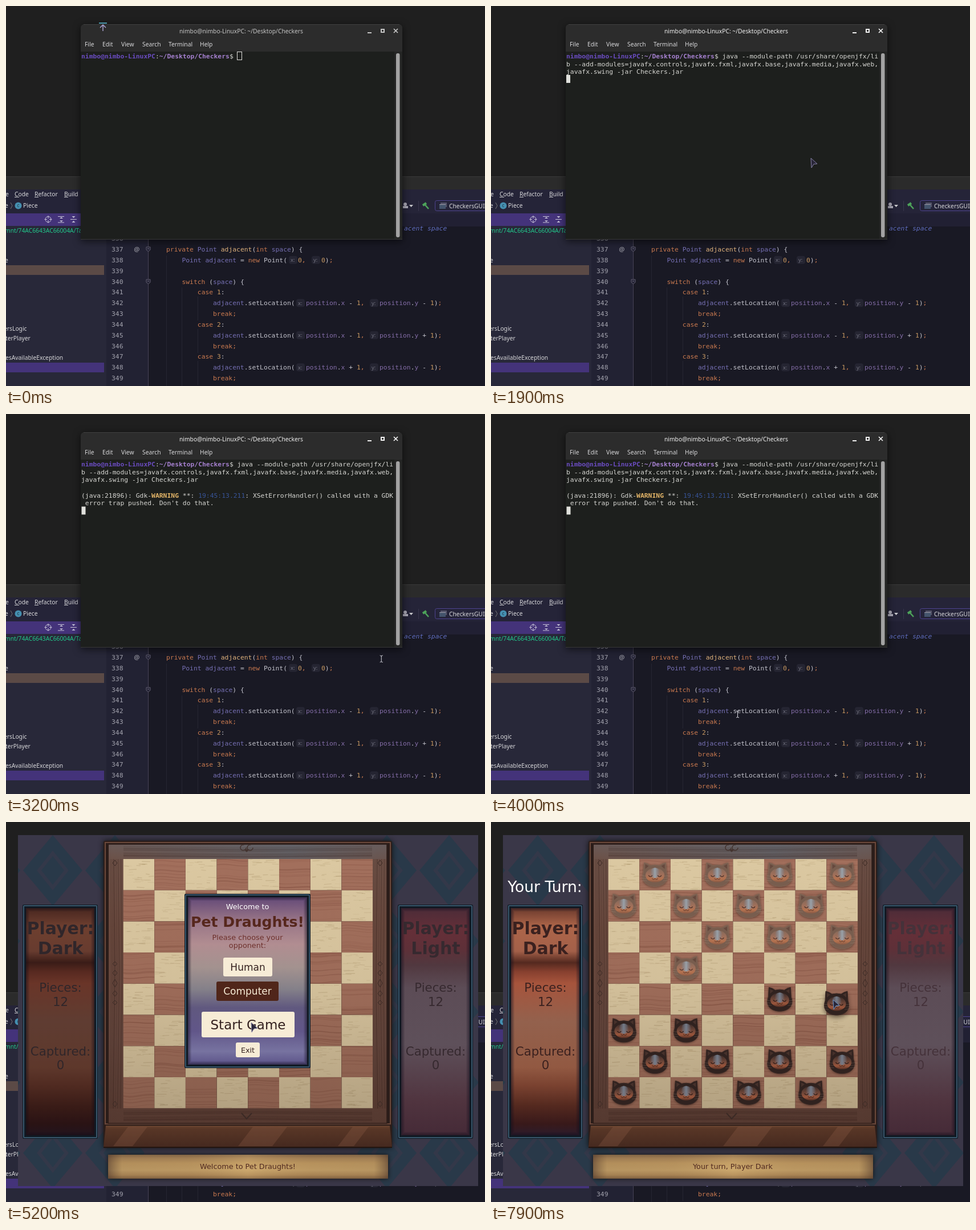
Animation, 840 px wide and 667 px high, one loop 8 s. Source, as an HTML page with a canvas:

```html
<!DOCTYPE html>
<html lang="en">
<head>
<meta charset="utf-8">
<title>Draughts launch</title>
<style>
html, body { margin: 0; width: 100%; height: 100%; overflow: hidden; background: #1f1f1f; }
canvas { display: block; }
</style>
</head>
<body>
<canvas id="stage" width="840" height="667"></canvas>
<script>
const W = 840, H = 667, LOOP = 8000, STEP = 100;
const UI = '"Noto Sans", "Open Sans", sans-serif';
const MONO = '"DejaVu Sans Mono", "Noto Sans Mono", monospace';
const GAME = '"DejaVu Sans", sans-serif';
const USER = 'nimbo', HOST = 'nimbo-LinuxPC', TITLE = 'Pet Draughts';
const CELL = 54.7, BX = 205.5, BY = 65;
const screen = document.getElementById('stage').getContext('2d');
let c = screen;

function layer(draw) {
  const canvas = document.createElement('canvas');
  canvas.width = W;
  canvas.height = H;
  c = canvas.getContext('2d');
  draw();
  c = screen;
  return canvas;
}
function randomizer(seed) {
  return () => (seed = (seed * 16807) % 2147483647) / 2147483647;
}
function rect(x, y, w, h, fill) {
  c.fillStyle = fill;
  c.fillRect(x, y, w, h);
}
function round(x, y, w, h, r, fill, stroke, width = 1) {
  c.beginPath();
  c.roundRect(x, y, w, h, r);
  if (fill) { c.fillStyle = fill; c.fill(); }
  if (stroke) { c.strokeStyle = stroke; c.lineWidth = width; c.stroke(); }
}
function line(points, color, width = 1) {
  c.beginPath();
  points.forEach(([x, y]) => c.lineTo(x, y));
  c.strokeStyle = color;
  c.lineWidth = width;
  c.stroke();
}
function poly(points, fill, stroke, width = 1) {
  c.beginPath();
  points.forEach(([x, y]) => c.lineTo(x, y));
  c.closePath();
  if (fill) { c.fillStyle = fill; c.fill(); }
  if (stroke) { c.strokeStyle = stroke; c.lineWidth = width; c.stroke(); }
}
function disc(x, y, rx, ry, fill) {
  c.beginPath();
  c.ellipse(x, y, rx, ry, 0, 0, 7);
  c.fillStyle = fill;
  c.fill();
}
function gradient(x0, y0, x1, y1, stops) {
  const g = c.createLinearGradient(x0, y0, x1, y1);
  stops.forEach(([at, color]) => g.addColorStop(at, color));
  return g;
}
function text(s, x, y, size, color, family = UI, style = '', align = 'left') {
  c.font = `${style} ${size}px ${family}`;
  c.textAlign = align;
  c.fillStyle = color;
  c.fillText(s, x, y + size * 0.36);
  return x + c.measureText(s).width;
}
const ui = (s, x, y, color = '#d8d8da') => text(s, x, y, 10.3, color);
const label = (s, x, y, size, color, style) => text(s, x, y, size, color, GAME, style, 'center');
function mono(x, y, spans) {
  spans.forEach(([s, color, style]) => { x = text(s, x, y, 11.36, color, MONO, style); });
}

// IDE behind the terminal
const KEY = '#c9794f', NAME = '#7670b4', FIELD = '#846da8', PLAIN = '#c3c3cc', NUM = '#c99a63';
const codeY = n => 427 + (n - 337) * 18.83;

function hint(s, x, y) {
  round(x - 2, y - 7, 15, 14, 4, '#252532');
  text(s, x + 1, y, 9.5, '#71717f');
}
function locationCall(n, dx, dy) {
  const y = codeY(n);
  mono(363, y, [['adjacent', NAME], ['.setLocation(', PLAIN]]);
  hint('x:', 511, y);
  mono(526, y, [['position', FIELD], ['.', PLAIN], ['x', FIELD], [` ${dx} `, PLAIN], ['1', NUM], [',', KEY]]);
  hint('y:', 640, y);
  mono(655, y, [['position', FIELD], ['.', PLAIN], ['y', FIELD], [` ${dy} `, PLAIN], ['1', NUM], [')', PLAIN], [';', KEY]]);
  mono(363, codeY(n + 1), [['break;', KEY]]);
}
function drawIde() {
  rect(0, 0, W, H, '#1f1f1f');
  rect(0, 299, W, 368, '#282839');
  rect(0, 299, W, 23, '#2b2b2b');
  line([[0, 299.5], [W, 299.5]], '#393939');
  rect(0, 322, W, 42, '#252438');
  rect(176, 364, 664, 23, '#212033');
  rect(176, 387, 74, 280, '#222233');
  rect(250, 387, 590, 280, '#191924');
  line([[249.5, 387], [249.5, H]], '#474356');

  ui('e', -1, 330);
  [['Code', 15, 8], ['Refactor', 50, 7], ['Build', 102, 7]].forEach(([s, x, w]) => {
    ui(s, x, 330);
    line([[x, 335.5], [x + w, 335.5]], '#c8c8cc');
  });
  ui('e', -2, 350);
  line([[8, 345], [11, 350.5], [8, 356]], '#777');
  disc(21.5, 350.5, 6, 6, '#458fb0');
  text('c', 21.5, 350, 8, '#203848', UI, '', 'center');
  ui('Piece', 30, 350);
  rect(0, 364, 131, 22, '#44337a');
  c.beginPath();
  c.arc(74, 374.5, 5, 0, 7);
  c.strokeStyle = '#c8c4d8';
  c.stroke();
  line([[74, 368], [74, 373]], '#c8c4d8');
  line([[74, 376], [74, 381]], '#c8c4d8');
  line([[67.5, 374.5], [72, 374.5]], '#c8c4d8');
  line([[76, 374.5], [80.5, 374.5]], '#c8c4d8');
  [[91, 369.5, 380], [113, 374.5, 374.5]].forEach(([x, a, b]) => {
    line([[x, a], [x + 11, a]], '#c8c4d8');
    line([[x, b], [x + 11, b]], '#c8c4d8');
  });
  poly([[94, 373], [97, 370.5], [100, 373]], '#c8c4d8');
  poly([[94, 376.5], [97, 379], [100, 376.5]], '#c8c4d8');
  poly([[115.5, 369], [121.5, 369], [118.5, 372]], '#c8c4d8');
  poly([[115.5, 380], [121.5, 380], [118.5, 377]], '#c8c4d8');
  ui('mnt/74AC6643AC66004A/Ta', -2, 394, '#22c98c');
  rect(0, 455, 172, 17, '#5b4a46');
  rect(0, 626, 172, 17, '#44337a');
  ui('e', -2, 446);
  ui('ersLogic', -4, 566);
  ui('terPlayer', -1, 583);
  ui('esAvailableException', -1, 617);

  for (let n = 336; n < 350; n++) mono(185, codeY(n), [[n, '#a2a2ad']]);
  text('@', 229.5, 427, 11, '#b0b0b8', UI, '', 'center');
  [427, 484].forEach(y => {
    poly([[246, y - 4], [253, y - 4], [253, y + 1], [249.5, y + 4], [246, y + 1]], '#222233', '#605c70');
    line([[248, y - 1], [251, y - 1]], '#77738a');
  });
  line([[281.5, 438], [281.5, H]], '#262632');
  line([[308.5, 494], [308.5, H]], '#262632');
  [510, 567, 623].forEach(y => line([[336.5, y], [336.5, y + 42]], '#262632'));
  mono(698, 390, [['acent space', '#626fc4', 'italic']]);
  mono(281, codeY(337), [['private ', KEY], ['Point ', NAME], ['adjacent', '#dfb27c'], ['(', PLAIN], ['int ', KEY], ['space', NAME], [') {', PLAIN]]);
  mono(308.4, codeY(338), [['Point adjacent ', NAME], ['= ', PLAIN], ['new ', KEY], ['Point(', PLAIN]]);
  hint('x:', 498, codeY(338));
  mono(512, codeY(338), [['0', NUM], [',', KEY]]);
  hint('y:', 538, codeY(338));
  mono(553, codeY(338), [['0', NUM], [')', PLAIN], [';', KEY]]);
  mono(308.4, codeY(340), [['switch ', KEY], ['(', PLAIN], ['space', NAME], [') {', PLAIN]]);
  [['-', '-'], ['-', '+'], ['+', '-']].forEach(([dx, dy], i) => {
    mono(335.8, codeY(341 + 3 * i), [['case ', KEY], [i + 1, NUM], [':', PLAIN]]);
    locationCall(342 + 3 * i, dx, dy);
  });

  disc(700, 348, 3, 3, '#aaa8b5');
  rect(696, 351, 9, 4, '#aaa8b5');
  poly([[707, 349], [714, 349], [710.5, 353]], '#c8c8cc');
  line([[723.5, 342], [723.5, 360]], '#38364c');
  line([[731, 350], [737, 346]], '#4da35a', 4);
  line([[734, 348], [741, 356]], '#4da35a', 2.5);
  round(752.5, 341.5, 100, 18, 3, '#25243a', '#4e438f');
  rect(762, 345, 11, 8, '#55556a');
  rect(760, 348, 11, 8, '#44546c');
  line([[760, 348.5], [771, 348.5]], '#9a9aa8');
  ui('CheckersGUI', 777, 351);
}

function drawTerminal() {
  c.shadowColor = 'rgba(0,0,0,.6)';
  c.shadowBlur = 14;
  c.shadowOffsetY = 3;
  round(131, 32, 564, 378, [6, 6, 0, 0], '#1d1f1d');
  c.shadowColor = 'transparent';
  round(131, 32, 564, 48, [6, 6, 0, 0], '#2c2c2c');
  line([[136, 32.5], [690, 32.5]], '#424242');
  line([[131, 409.5], [695, 409.5]], '#373737');
  rect(681, 80, 14, 329, '#242524');
  round(684, 83, 6.5, 323, 3, '#a3a3a3');
  ['File', 'Edit', 'View', 'Search', 'Terminal', 'Help'].forEach((s, i) =>
    ui(s, [138, 169, 202, 239, 285, 340][i], 67));
}
function drawTitle(focused) {
  const color = focused ? '#f0f0f0' : '#c4c4c4';
  text(`${USER}@${HOST}: ~/Desktop/Checkers`, 412.5, 44, 10.3, color, UI, '500', 'center');
  rect(634, 46, 7, 2, color);
  c.strokeStyle = color;
  c.lineWidth = 2;
  c.strokeRect(658, 41, 5, 5);
  line([[680, 40], [687, 47]], color, 1.7);
  line([[687, 40], [680, 47]], color, 1.7);
}
const row = n => 88 + n * 13.67;
function drawShell(t) {
  const fg = '#d6d6d2';
  const prompt = [[`${USER}@${HOST}`, '#6a4cc0', 'bold'], [':', fg], ['~/Desktop/Checkers', '#a580cf', 'bold'], ['$ ', fg]];
  if (t < 1300) {
    mono(132, row(0), prompt);
    c.strokeStyle = '#e0e0dc';
    c.lineWidth = 1;
    c.strokeRect(405.5, 80.5, 8, 14);
    return;
  }
  mono(132, row(0), [...prompt, ['java --module-path /usr/share/openjfx/li', fg]]);
  mono(132, row(1), [['b --add-modules=javafx.controls,javafx.fxml,javafx.base,javafx.media,javafx.web,', fg]]);
  mono(132, row(2), [['javafx.swing -jar Checkers.jar', fg]]);
  if (t >= 1900 && t < 2300) rect(132, 121, 7, 14, '#e0e0dc');
  if (t < 2300) return;
  mono(132, row(4), [['(java:21896): Gdk-', fg], ['WARNING', '#e3b568', 'bold'], [' **: ', fg], ['19:45:13.211', '#38559a'], [': XSetErrorHandler() called with a GDK', fg]]);
  mono(132, row(5), [[" error trap pushed. Don't do that.", fg]]);
  if (t >= 2700) rect(132.5, 162.5, 7, 14, '#e0e0dc');
}
function drawMenu(hover) {
  c.shadowColor = 'rgba(0,0,0,.5)';
  c.shadowBlur = 7;
  round(519.5, 128.5, 126, 204, 6, '#393639', '#4b494b');
  c.shadowColor = 'transparent';
  if (hover) rect(520, 247, 125, 24, '#4b4a47');
  [187.5, 218.5, 274.5].forEach(y => line([[520, y], [645, y]], '#5a575a'));
  [['Open Terminal', 147], ['Open Tab', 171], ['Close Window', 202], ['Copy', 234, '#858385'],
    ['Paste', 258], ['Profiles', 289], ['Show Menubar', 313]].forEach(([s, y, color]) => ui(s, 547, y, color || '#eeeef0'));
  round(528, 141.5, 12, 11, 2, '#2b5364', '#62b8c4');
  line([[530, 144], [533, 147], [530, 150]], '#d8a0c0');
  line([[534, 150], [538, 150]], '#d8a0c0');
  round(530, 229, 5, 7, 1, null, '#5d3b8a');
  round(534, 232, 5, 7, 1, null, '#5d3b8a');
  round(528, 253, 10, 12, 1, '#c28a55');
  rect(531, 251, 5, 3, '#dddddd');
  rect(533, 257, 8, 8, '#eeeeec');
  poly([[630, 286], [635, 289.5], [630, 293]], '#eeeeee');
  disc(533, 313.5, 7, 7, '#70bd91');
  line([[529, 313], [532, 316.5], [537, 310]], '#1c4b3b', 2);
}

// Game window
const DARK_PANEL = [[0, '#6b3a2d'], [.08, '#ad6549'], [.19, '#a36049'], [.24, '#54291f'], [.28, '#87402f'],
  [.33, '#a6543c'], [.5, '#93614d'], [.7, '#925942'], [.78, '#7a4230'], [.87, '#54291f'], [.95, '#38191a'], [1, '#2c1c2c']];
const LIGHT_PANEL = [[0, '#4c2c38'], [.1, '#652f38'], [.18, '#5e3038'], [.25, '#51383f'], [.35, '#5c4c56'], [.6, '#5e505a'], [.85, '#50343f'], [1, '#452a37']];

function drawFrame(x, y, w, h, stops) {
  round(x, y, w, h, 2, '#101923');
  round(x + 2, y + 2, w - 4, h - 4, 1, null, '#38566b', 2);
  rect(x + 6, y + 6, w - 12, h - 12, gradient(0, y + 6, 0, y + h - 6, stops));
  for (let i = 0; i < 6; i++) {
    c.strokeStyle = `rgba(18,14,28,${.5 - i * .08})`;
    c.lineWidth = 1;
    c.strokeRect(x + 6.5 + i, y + 6.5 + i, w - 13 - 2 * i, h - 13 - 2 * i);
  }
}
function drawDiamonds() {
  for (const cx of [82, 777]) for (let cy = 85; cy < 700; cy += 124) for (const dx of [-109, 0, 109]) {
    [[52, 62, '#293949'], [28, 35, '#333849'], [20, 25, '#293949']].forEach(([rx, ry, fill]) =>
      poly([[cx + dx, cy - ry], [cx + dx + rx, cy], [cx + dx, cy + ry], [cx + dx - rx, cy]], fill));
  }
}
function clipped(x, y, w, h, draw) {
  c.save();
  c.beginPath();
  c.rect(x, y, w, h);
  c.clip();
  draw();
  c.restore();
}
function drawCells() {
  const rnd = randomizer(73);
  for (let r = 0; r < 8; r++) for (let k = 0; k < 8; k++) {
    const x = BX + k * CELL, y = BY + r * CELL, dark = (r + k) % 2;
    clipped(x, y, CELL, CELL, () => {
      rect(x, y, CELL, CELL, dark ? '#a26f5c' : '#dbc8a1');
      const bend = rnd() * 10 - 5;
      for (let i = 0; i < (dark ? 13 : 24); i++) {
        const gx = dark ? x : x + rnd() * 45, gy = y + rnd() * CELL;
        c.beginPath();
        c.moveTo(gx, gy);
        if (dark) c.bezierCurveTo(x + 18, gy - bend, x + 36, gy + bend, x + 56, gy + bend * .4);
        else c.lineTo(gx + 5 + rnd() * 13, gy + rnd() * 2 - 1);
        c.strokeStyle = dark ? `rgba(105,55,43,${.08 + rnd() * .22})` : `rgba(150,125,85,${.1 + rnd() * .2})`;
        c.lineWidth = .6 + rnd();
        c.stroke();
      }
    });
  }
  rect(BX, BY, 8 * CELL, 8 * CELL, gradient(0, BY, 0, BY + 8 * CELL, [[0, 'rgba(50,35,25,0)'], [.5, 'rgba(50,35,25,.05)'], [1, 'rgba(50,35,25,.23)']]));
}
function drawWoodFrame() {
  rect(180, 39, 488, 490, gradient(0, 39, 0, 529, [[0, '#6a5a57'], [.06, '#6c5046'], [.3, '#68483d'], [.7, '#60433a'], [1, '#553930']]));
  rect(180, 39, 488, 26, gradient(180, 0, 668, 0, [[0, 'rgba(85,110,130,0)'], [.65, 'rgba(85,110,130,.4)'], [1, 'rgba(85,110,130,.1)']]));
  const rnd = randomizer(19);
  for (let i = 0; i < 18; i++) {
    const tone = `rgba(45,27,22,${.05 + rnd() * .17})`, x = 183 + rnd() * 20, y = 43 + rnd() * 18;
    line([[x, 65], [x + 2, 260], [x - 1, 503]], tone);
    line([[x + 462, 65], [x + 460, 280], [x + 463, 503]], tone);
    line([[206, y], [420, y + 2], [642, y]], tone);
    line([[206, y + 464], [420, y + 462], [642, y + 464]], tone);
  }
  c.strokeStyle = '#2c1d19';
  c.lineWidth = 1.5;
  c.strokeRect(179, 39, 489, 490);
  [416, 428].forEach(x => {
    c.beginPath();
    c.arc(x, 45, 5, 0, 5);
    c.strokeStyle = '#443430';
    c.lineWidth = 1.5;
    c.stroke();
  });
  poly([[417, 48], [427, 48], [422, 53]], '#443430');
  line([[413, 511], [422, 521], [431, 511]], '#3b2a25', 2);
  [191, 656].forEach(x => {
    [[0, 7], [-18, 5], [18, 5], [-34, 4], [34, 4], [-211, 5], [212, 5]].forEach(([dy, s]) =>
      poly([[x, 283 + dy - s], [x + 4, 283 + dy], [x, 283 + dy + s], [x - 4, 283 + dy]], null, '#3b2a25'));
  });
}
function drawBoard() {
  rect(21, 23, 807, 616, '#3a3748');
  clipped(21, 23, 807, 616, drawDiamonds);
  c.shadowColor = '#111';
  c.shadowBlur = 10;
  round(171, 33, 506, 539, 3, '#2b1d1a');
  c.shadowColor = 'transparent';
  c.strokeStyle = '#6b483a';
  c.lineWidth = 2;
  c.strokeRect(174, 36, 500, 494);
  drawWoodFrame();
  drawCells();
  poly([[175, 533], [673, 533], [677, 571], [171, 571]], gradient(0, 533, 0, 571, [[0, '#68432f'], [.15, '#583626'], [1, '#45291f']]));
  [[196, 34], [415, 60], [590, 28]].forEach(([x, w]) =>
    poly([[x + 18, 535], [x + 18 + w, 535], [x + w - 8, 569], [x - 8, 569]], 'rgba(150,100,75,.25)'));
  line([[171, 571], [677, 571]], '#24150f', 2);
  c.shadowColor = '#111';
  c.shadowBlur = 8;
  rect(179, 584, 491, 42, gradient(0, 584, 0, 626, [[0, '#866848'], [.15, '#a98558'], [.35, '#c09a62'], [.65, '#c6a269'], [.85, '#b08a58'], [1, '#836342']]));
  c.shadowColor = 'transparent';
  rect(179, 584, 491, 42, gradient(179, 0, 670, 0, [[0, 'rgba(75,52,42,.6)'], [.05, 'rgba(100,75,50,.15)'], [.28, 'rgba(100,72,48,.12)'],
    [.5, 'rgba(225,190,125,.2)'], [.72, 'rgba(110,80,50,.12)'], [.95, 'rgba(100,75,50,.15)'], [1, 'rgba(75,52,42,.6)']]));
}
function drawPanel(x, name, stops, dim, color) {
  drawFrame(x, 145, 132, 411, stops);
  if (dim) rect(x + 6, 151, 120, 399, 'rgba(22,10,12,.42)');
  const mid = x + 66.5;
  label('Player:', mid, 186, 29.9, color, 'bold');
  label(name, mid, 221, 29.9, color, 'bold');
  [['Pieces:', 290], ['12', 315], ['Captured:', 402], ['0', 426]].forEach(([s, y]) => label(s, mid, y, 21.3, color));
}
function button(s, x, y, w, h, size, selected) {
  round(x, y, w, h, 3, selected ? '#50261a' : '#f7ecd6');
  label(s, x + w / 2, y + h / 2, size, selected ? '#f7ecd6' : '#34211f');
}
function drawDialog(computer) {
  drawFrame(313, 126, 221, 306, [[0, '#634978'], [.13, '#957285'], [.28, '#b18d91'], [.42, '#a3928f'], [.55, '#848089'],
    [.66, '#60587f'], [.8, '#615689'], [.92, '#7773a0'], [1, '#5b5288']]);
  label('Welcome to', 423.5, 148, 12.8, '#ffffff');
  label(TITLE + '!', 423.5, 175, 25.2, '#56271d', 'bold');
  label('Please choose your', 423.5, 202, 12.8, '#6d302c');
  label('opponent:', 423.5, 216, 12.8, '#6d302c');
  button('Human', 381, 238, 86, 33, 17, !computer);
  button('Computer', 369, 280, 109, 34, 17, computer);
  button('Start Game', 343, 333, 163, 45, 23);
  button('Exit', 403, 387, 42, 26, 12.8);
}
function drawCat(x, y, dark, lifted) {
  const fur = dark ? '#30221f' : '#785d4e', rim = dark ? '#3d2a25' : '#846756', ear = dark ? '#46312b' : '#65493e';
  c.save();
  c.translate(x, y);
  c.shadowColor = 'rgba(30,16,12,.6)';
  c.shadowBlur = lifted ? 8 : 4;
  c.shadowOffsetY = lifted ? 4 : 1;
  c.beginPath();
  c.moveTo(-20, -4);
  c.lineTo(-19, -21);
  c.quadraticCurveTo(-13, -20, -8, -16);
  c.quadraticCurveTo(0, -18, 8, -16);
  c.quadraticCurveTo(13, -20, 19, -21);
  c.lineTo(20, -4);
  c.bezierCurveTo(26, 12, 14, 21, 0, 21);
  c.bezierCurveTo(-14, 21, -26, 12, -20, -4);
  c.fillStyle = fur;
  c.fill();
  c.shadowColor = 'transparent';
  c.strokeStyle = rim;
  c.lineWidth = 1;
  c.stroke();
  [-1, 1].forEach(s => {
    poly([[s * 17, -18], [s * 11, -15], [s * 17, -10]], ear);
    [4, 8, 12].forEach(yy => line([[s * 14, yy - 1], [s * 23, yy - 2]], 'rgba(215,190,165,.25)', .7));
  });
  disc(0, 1, 16.5, 12.5, gradient(0, -11, 0, 14, dark ? [[0, '#3d2c28'], [.45, '#6f4638'], [.75, '#9a553b'], [1, '#4c2b22']]
    : [[0, '#85695a'], [.45, '#a1705a'], [.75, '#b4714e'], [1, '#835744']]));
  disc(0, -3, 9, 9, gradient(-9, 0, 9, 0, [[0, 'rgba(120,135,155,0)'], [.5, dark ? '#747b88' : '#9aa2a9'], [1, 'rgba(120,135,155,0)']]));
  c.strokeStyle = dark ? '#2a1b19' : '#4a302a';
  [-8, 8].forEach(ex => {
    c.beginPath();
    c.arc(ex, 0, 3.5, .35, 2.8);
    c.lineWidth = 1.2;
    c.stroke();
  });
  [-2.5, 2.5].forEach(mx => {
    c.beginPath();
    c.arc(mx, 6, 2.5, .2, 2.9);
    c.lineWidth = .8;
    c.stroke();
  });
  c.restore();
}
const cellAt = (r, k) => [BX + (k + .5) * CELL, BY + (r + .5) * CELL];
function drawPieces(t, [mx, my]) {
  let held;
  for (const r of [0, 1, 2, 5, 6, 7]) for (let k = (r + 1) % 2; k < 8; k += 2) {
    let at = cellAt(r, k);
    if (r === 2 && k === 1 && t >= 6700) at = cellAt(3, 2);
    if (r === 5 && k === 4 && t >= 6000) {
      at = cellAt(4, 5);
      if (t < 6500) { held = [mx, my + 10]; continue; }
    }
    if (r === 5 && k === 6 && t >= 7400) {
      held = t < 7600 ? [mx + 6, my + 6] : [606, 318];
      continue;
    }
    drawCat(...at, r > 4);
  }
  if (held) drawCat(...held, true, true);
}
function drawGame(t, mouse) {
  const playing = t >= 5400;
  c.drawImage(board, 0, 0);
  drawPanel(29, 'Dark', DARK_PANEL, !playing, playing ? '#3b211f' : '#30262a');
  drawPanel(687, 'Light', LIGHT_PANEL, false, playing ? '#45323a' : '#36292f');
  label(t < 6700 ? `Welcome to ${TITLE}!` : 'Your turn, Player Dark', 424, 604, 12.8, '#512a20');
  if (playing) {
    label('Your Turn:', 94.5, 113, 26.6, '#ffffff');
    drawPieces(t, mouse);
  } else {
    drawDialog(t >= 5000);
  }
}

// Pointer: time, x, y
const PATH = [[0, 170, 37], [300, 519, 128], [800, 519, 128], [1100, 585, 261], [1200, 585, 261], [1300, 575, 254],
  [1400, 575, 254], [1500, 561, 267], [2900, 561, 267], [3300, 690, 484], [3400, 690, 484], [4000, 432, 527],
  [4300, 555, 418], [4500, 555, 418], [4600, 426, 360], [4700, 372, 312], [4800, 372, 312], [5000, 420, 300],
  [5200, 430, 352], [5800, 430, 352], [5900, 451, 357], [6300, 508, 321], [6500, 508, 316], [6900, 508, 316],
  [7000, 530, 380], [7200, 565, 418], [7400, 556, 358], [7600, 600, 312], [7700, 600, 312], [7800, 668, 374], [7900, 600, 312]];
function pointerAt(t) {
  const i = PATH.findIndex(p => p[0] >= t);
  if (i < 1) return PATH[i < 0 ? PATH.length - 1 : 0].slice(1);
  const [t0, x0, y0] = PATH[i - 1], [t1, x1, y1] = PATH[i];
  const f = (t - t0) / (t1 - t0);
  return [x0 + (x1 - x0) * f, y0 + (y1 - y0) * f];
}
function drawPointer(t, [x, y]) {
  if (t < 100) {
    line([[163, 30], [177, 30]], '#4c9aad', 2);
    line([[170, 44], [170, 33]], '#a9a0cf', 1.5);
    line([[165, 38], [170, 33], [175, 38]], '#a9a0cf', 1.5);
  } else if (y > 411 && t < 4200) {
    line([[x - 2, y - 6], [x, y - 5], [x + 3, y - 6]], '#d5d5dd');
    line([[x + .5, y - 5], [x + .5, y + 5]], '#d5d5dd');
    line([[x - 2, y + 6], [x, y + 5], [x + 3, y + 6]], '#d5d5dd');
  } else {
    poly([[x, y], [x + 11, y + 10], [x + 5, y + 10.5], [x + 1, y + 17]], '#292638', t < 5400 ? '#8580a4' : '#6d91c2');
  }
}

const ide = layer(drawIde);
const terminal = layer(drawTerminal);
const board = layer(drawBoard);

function render(t) {
  const mouse = pointerAt(t);
  c.drawImage(ide, 0, 0);
  if (t >= 4200) {
    drawGame(t, mouse);
  } else {
    c.drawImage(terminal, 0, 0);
    drawTitle(t >= 500);
    drawShell(t);
    if (t >= 800 && t < 1300) drawMenu(t >= 1100);
    if (t >= 2400 && t < 2700) rect(210, 36, 427, 578, '#000');
  }
  drawPointer(t, mouse);
}
const start = performance.now();
function tick() {
  const t = (performance.now() - start) % LOOP;
  render(Math.floor(t / STEP) * STEP);
  requestAnimationFrame(tick);
}
tick();
</script>
</body>
</html>
```
